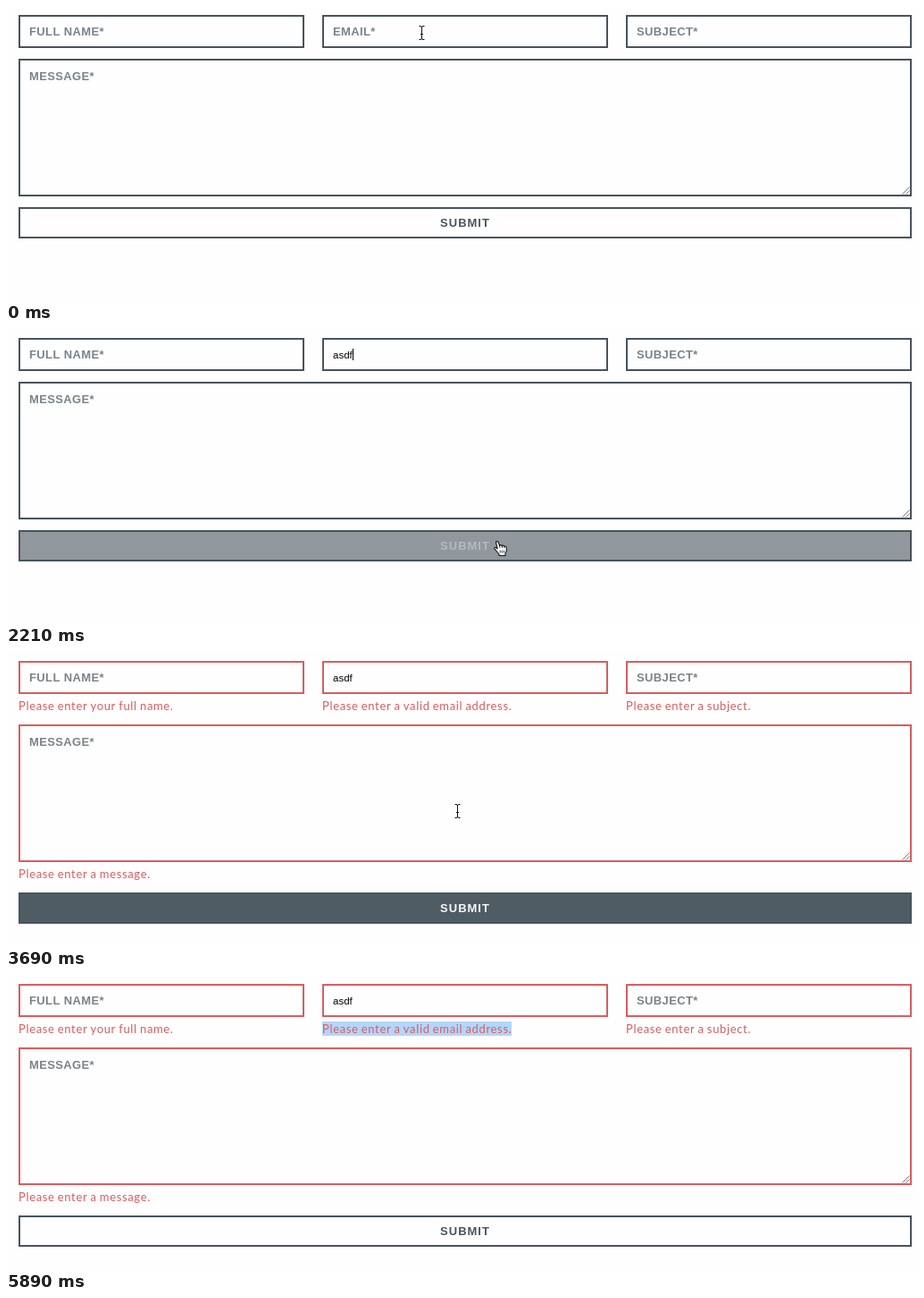
Animation of 1021x330 px, one loop 6640 ms. Source, as an HTML page with a canvas:

```html
<!DOCTYPE html>
<html lang="en">
<head>
<meta charset="utf-8">
<title>Contact form</title>
<style>
html, body { margin: 0; width: 100%; height: 100%; overflow: hidden; background: #fefefe; }
canvas { display: block; width: 1021px; height: 330px; }
</style>
</head>
<body>
<canvas id="stage" width="1021" height="330"></canvas>
<script>
const ctx = document.getElementById('stage').getContext('2d');
const LOOP = 6640, BEAT = 147.5, LEAD = 11;
const SLATE = [72, 84, 92], PAPER = [254, 254, 254];
const RED = '#d95d5f', GREY = '#7b8389';
const SANS = '"Liberation Sans", Arial, sans-serif';
const LABEL = 'bold 13px ' + SANS;
const VALUE = '11.5px ' + SANS;
const NOTE = '13px Lato, sans-serif';
const EMAIL_NOTE = 'Please enter a valid email address.';

// The picture advances in beats; all of these are beat numbers.
const FOCUS = 3, TYPE = 5, RETURN = 7, MOVE = 9, ENTER = 13.7, CLICK = 16;
const REJECT = 18.45, LEAVE = 24.7, LIFT = 25, DRAG = 32, EXIT = 39, GONE = 40;

const clamp = v => Math.max(0, Math.min(1, v));
const easeOut = (u, p) => 1 - (1 - u) ** p;
const lerp = (a, b, k) => a + (b - a) * k;
const rgb = c => 'rgb(' + c.map(Math.round) + ')';
const mix = (a, b, k) => rgb(a.map((v, i) => lerp(v, b[i], k)));

function smooth(n, from, to) {
  const u = clamp((n - from) / (to - from));
  return u * u * (3 - 2 * u);
}

function pointerAt(n) {
  if (n < TYPE) return [465, 30];
  if (n < RETURN || n >= GONE) return null;
  if (n >= EXIT) return [727, 159];
  if (n < LIFT) {
    const k = easeOut(clamp((n - MOVE) / 7), 2);
    return [lerp(612, 549, k), lerp(161, 240, k)];
  }
  if (n <= DRAG) {
    const u = (n - LIFT) / (DRAG - LIFT);
    return [lerp(505, 354, easeOut(u, 3)), lerp(178, 60, easeOut(u, 4))];
  }
  const k = smooth(n, DRAG, DRAG + 5);
  return [lerp(354, 599, k), lerp(60, 68, k)];
}

function caretOn(n) {
  const blink = Math.floor(Math.max(0, n - TYPE - 1) / 3.5);
  return n >= FOCUS && n < CLICK && blink % 2 === 0;
}

function setFont(font, gap, wordGap = 0) {
  ctx.font = font;
  ctx.letterSpacing = gap + 'px';
  ctx.wordSpacing = wordGap + 'px';
}

const noteFont = () => setFont(NOTE, .65, -.75);

function text(str, x, y, color) {
  ctx.fillStyle = color;
  ctx.fillText(str, x, y);
}

function label(str, x, y) {
  setFont(LABEL, .37);
  text(str, x, y, GREY);
}

function box(x, y, w, h, color) {
  ctx.strokeStyle = color;
  ctx.lineWidth = 2;
  ctx.strokeRect(x + 1, y + 1, w - 2, h - 2);
}

function stroke(path, color, width) {
  ctx.strokeStyle = color;
  ctx.lineWidth = width;
  ctx.stroke(new Path2D(path));
}

function beam() {
  stroke('M-2.5-7.5H-1Q.5-7.5 .5-6Q.5-7.5 2-7.5H3.5M.5-6V7M-2.5 7.5H-1Q.5 7.5 .5 6Q.5 7.5 2 7.5H3.5M-1 1.5H2', '#111', 1);
}

function arrow() {
  const shape = 'M0 0V12.8L2.9 10L5 15L7.2 14L5.1 9.2H9Z';
  ctx.shadowColor = 'rgba(0,0,0,.35)';
  ctx.shadowBlur = 2;
  ctx.shadowOffsetY = 1;
  stroke(shape, '#fff', 2);
  ctx.shadowColor = 'transparent';
  ctx.fillStyle = '#000';
  ctx.fill(new Path2D(shape));
}

function hand() {
  ctx.translate(-4, -1);
  const palm = 'M2.6 2.2C2.2.4 4.6 0 5.2 1.6L6.5 5.4C7 4.3 8.8 4.3 9.2 5.7C10 4.8 11.4 5 11.8 6.4C12.6 5.7 14 6.1 14.3 7.5C14.8 10 14.3 12 13 14V16.5H6V14.8C4.5 13.4 3.3 11.5 1.1 9.2C-.1 7.9 1.6 6.7 2.9 7.8L4.2 8.8Z';
  ctx.fillStyle = '#fff';
  ctx.fill(new Path2D(palm));
  stroke(palm, '#111', 1.1);
  stroke('M6.5 5.4L7.2 8M9.2 5.7L9.6 8M11.8 6.4L12 8.3M7.2 10.5V13.5M9.3 10.5V13.5M11.4 10.5V13.5', '#111', .8);
}

// The pointer's look follows from what lies beneath it.
function drawPointer(pos, shift) {
  if (!pos) return;
  const [x, y] = pos.map(Math.round);
  const over = (top, h) => y >= top && y < top + h;
  const onText = over(10, 37) || over(59 + shift, 154) || (shift && over(52, 17));
  ctx.save();
  ctx.translate(x, y);
  ctx.lineJoin = 'round';
  if (over(225 + shift * 2, 35)) hand();
  else if (onText) beam();
  else arrow();
  ctx.restore();
}

function drawSelection(end) {
  noteFont();
  let w = 0;
  for (let i = 1; i <= EMAIL_NOTE.length; i++) {
    const next = ctx.measureText(EMAIL_NOTE.slice(0, i)).width;
    if (354 + (w + next) / 2 > end) break;
    w = next;
  }
  ctx.fillStyle = '#b4d5fc';
  ctx.fillRect(354, 52, Math.round(w), 16);
}

function drawNotes(alpha) {
  noteFont();
  ctx.globalAlpha = alpha;
  text('Please enter your full name.', 14, 65, RED);
  text(EMAIL_NOTE, 354, 65, RED);
  text('Please enter a subject.', 694, 65, RED);
  text('Please enter a message.', 14, 253, RED);
  ctx.globalAlpha = 1;
}

function drawFields(n, edge) {
  const value = 'asdf'.slice(0, Math.max(0, 2 * (n - TYPE + 1)));
  ['FULL NAME*', 'EMAIL*', 'SUBJECT*'].forEach((name, i) => {
    const left = 14 + i * 340;
    box(left, 10, 320, 37, edge);
    if (i !== 1 || !value) label(name, left + 12, 33);
  });
  setFont(VALUE, 0);
  text(value, 366, 33, '#000');
  if (caretOn(n)) {
    ctx.fillRect(366 + Math.round(ctx.measureText(value).width), 22, 1, 13);
  }
}

function drawMessage(top, edge) {
  box(14, top, 1000, 154, edge);
  label('MESSAGE*', 26, top + 24);
  ctx.save();
  ctx.translate(1011.5, top + 151.5);
  stroke('M-8 0L0-8M-4 0L0-4', '#777', 1);
  ctx.restore();
}

function drawButton(y, k) {
  ctx.fillStyle = mix(PAPER, SLATE, k);
  ctx.fillRect(14, y, 1000, 35);
  box(14, y, 1000, 35, rgb(SLATE));
  setFont(LABEL, 1);
  const w = ctx.measureText('SUBMIT').width;
  text('SUBMIT', 514 - w / 2, y + 22, mix(SLATE, PAPER, k));
}

function draw(t) {
  const n = Math.floor((t + LEAD) / BEAT);
  const pos = pointerAt(n);
  const fade = smooth(n, REJECT, 21);
  const hover = smooth(n, ENTER, 16) - smooth(n, LEAVE, 27);
  const shift = fade ? 22 : 0;
  const edge = fade ? RED : rgb(SLATE);

  ctx.fillStyle = rgb(PAPER);
  ctx.fillRect(0, 0, 1021, 330);
  drawFields(n, edge);
  drawMessage(59 + shift, edge);
  if (n > DRAG) drawSelection(n < EXIT ? pos[0] : 599);
  if (fade) drawNotes(fade);
  drawButton(225 + shift * 2, hover);
  drawPointer(pos, shift);
}

const start = performance.now();
function tick() {
  draw((performance.now() - start) % LOOP);
  requestAnimationFrame(tick);
}
tick();
</script>
</body>
</html>
```
